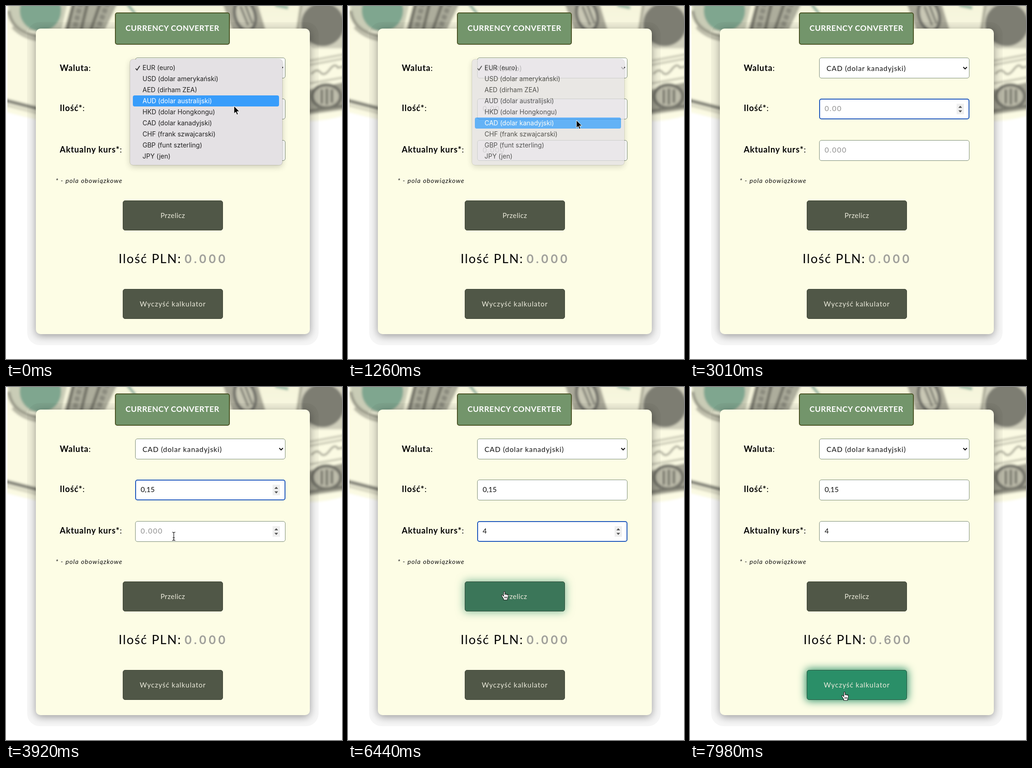
An HTML page for the animation above (8 s loop, 731 by 766 pixels).

```html
<!DOCTYPE html>
<html lang="pl">
<head>
<meta charset="utf-8">
<title>Currency converter</title>
<style>
  html, body { margin: 0; width: 100%; height: 100%; overflow: hidden; background: #fff; }
  #stage { position: relative; width: 731px; height: 766px; overflow: hidden; font: 15.5px/20px Lato, sans-serif; color: #111; }
  #stage div, #stage svg { position: absolute; box-sizing: border-box; white-space: pre; }
  .card { left: 65px; top: 49px; width: 596px; height: 663px; border-radius: 10px; background: #fdfde5;
    box-shadow: 0 4px 18px rgba(0, 0, 0, .38), 0 5px 0 19px rgba(0, 0, 0, .035); }
  .title { left: 237px; top: 14px; width: 250px; height: 70px; border: 2px solid #4b5526; border-radius: 5px;
    background: #73956b; color: #fff; font-size: 17px; font-weight: 700; line-height: 63px;
    letter-spacing: .5px; text-align: center; }
  .label { left: 117px; font-size: 18px; font-weight: 700; letter-spacing: .9px; color: #000; }
  .label span { font-weight: 400; }
  .note { left: 108px; top: 369px; font-size: 14px; font-style: italic; letter-spacing: 1.1px; }
  .field { left: 281px; width: 327px; height: 45px; border: 1px solid #7c8d75; border-radius: 5px; background: #fff; }
  .field.focus { border: 2px solid #2159bd; }
  .value { left: 293px; }
  .value.empty { color: #8f8f8f; letter-spacing: 1.8px; }
  .spin { left: 580px; width: 16px; height: 23px; background: #efefef; }
  .spin.hot { background: #d0d0d0; }
  .spin svg { left: 0; top: 0; }
  .button { left: 254px; width: 218px; height: 65px; border: 1px solid #3c4234; border-radius: 5px;
    color: #ecebdc; font-size: 15px; line-height: 62px; text-align: center; }
  .result { top: 532px; font-size: 27px; line-height: 32px; letter-spacing: 1.9px; color: #000; }
  .digits { top: 533px; font: 600 25px/32px Inter, sans-serif; letter-spacing: 4.3px; color: #a0a09b; }
  .menu { left: 270px; top: 116px; width: 331px; height: 229px; border-radius: 6px; background: #e4e1e4;
    box-shadow: 0 0 0 .5px rgba(0, 0, 0, .25), 0 4px 14px rgba(0, 0, 0, .2);
    font: 14px/24px Inter, sans-serif; color: #222; }
  .row { left: 6px; width: 318px; height: 24px; padding-left: 21px; border-radius: 4px; }
  .row.on { background: #389dfb; color: #fff; }
</style>
</head>
<body>
<div id="stage">
  <svg width="731" height="270" viewBox="0 0 731 270">
    <defs>
      <filter id="soft"><feGaussianBlur stdDeviation="2.6"/></filter>
      <linearGradient id="paper" x1="0" y1="0" x2="0" y2="1">
        <stop offset="0" stop-color="#f4f3da"/>
        <stop offset=".3" stop-color="#fbfae3"/>
        <stop offset="1" stop-color="#fbfae3"/>
      </linearGradient>
      <clipPath id="sheet"><path d="M3 0H731V270H3Z"/></clipPath>
    </defs>
    <g clip-path="url(#sheet)"><g filter="url(#soft)" fill="none">
      <path d="M-9-9H740V236Q700 250 650 250H80Q40 240-9 228Z" fill="url(#paper)"/>
      <path d="M4-9H134L120 54H30Q8 40 4-9Z" fill="#c9ccb6"/>
      <circle cx="75" cy="10" r="45" fill="#7fa68f"/>
      <path d="M6 10Q12 56 70 66" stroke="#9b9b8b" stroke-width="7"/>
      <path d="M14 46Q36 70 72 74" stroke="#b3b2a0" stroke-width="5"/>
      <path d="M-5 204L70 223" stroke="#85857a" stroke-width="8"/>
      <path d="M-5 214L70 233" stroke="#d3d2bd" stroke-width="5"/>
      <path d="M144-9L126 54H214L244-9Z" fill="#adad9c"/>
      <path d="M148-9L133 54M178-9L163 54M206-9L184 54" stroke="#737368" stroke-width="7"/>
      <path d="M163-9L148 54M222-9L198 54" stroke="#8a8a7e" stroke-width="11" stroke-dasharray="11 4"/>
      <path d="M264-4L282 18" stroke="#94b3a0" stroke-width="6"/>
      <path d="M470-9L494 56H566L546-9Z" fill="#aaa999"/>
      <ellipse cx="520" cy="20" rx="22" ry="34" transform="rotate(-16 520 20)" fill="#c9c8b5" stroke="#72726a" stroke-width="7"/>
      <path d="M510 0L527 42M520-4L536 38" stroke="#828277" stroke-width="5"/>
      <path d="M586-2L614 4" stroke="#9cbba6" stroke-width="7"/>
      <path d="M642-9L632 58L668 92H740V-9Z" fill="#cfcebb"/>
      <path d="M643-9L633 58" stroke="#a5a492" stroke-width="5"/>
      <circle cx="689" cy="40" r="47" fill="#7d7d72"/>
      <path d="M660 119L740 104M660 128L740 113M660 168L740 154" stroke="#c0bfac" stroke-width="4"/>
      <path d="M664 148Q676 134 684 144T704 138T722 134L740 130" stroke="#a3a292" stroke-width="4"/>
      <path d="M656 182L740 164V224L656 236Z" fill="#a5a494"/>
      <ellipse cx="697" cy="196" rx="31" ry="25" fill="#bdbcaa" stroke="#717167" stroke-width="7"/>
      <path d="M687 181V212M698 179V214M709 181V210" stroke="#7a7a6f" stroke-width="6"/>
      <path d="M656 228L740 216" stroke="#77776c" stroke-width="5"/>
    </g></g>
  </svg>

  <div class="card"></div>
  <div class="title">CURRENCY CONVERTER</div>
  <div class="label" style="top:124px">Waluta<span>:</span></div>
  <div class="label" style="top:211px">Ilość*<span>:</span></div>
  <div class="label" style="top:301px">Aktualny kurs*<span>:</span></div>
  <div class="note">* - pola obowiązkowe</div>

  <div class="field" id="currency" style="top:112px"></div>
  <div id="chosen" style="left:297px;top:125px;letter-spacing:.9px"></div>
  <svg style="left:592px;top:129px" width="14" height="12"><path d="M2.5 3.5L6.5 7.5L10.5 3.5" fill="none" stroke="#111" stroke-width="2"/></svg>
  <div class="field" id="amount" style="top:201px"></div>
  <div class="value" id="amountText" style="top:212px"></div>
  <div class="spin" id="amountSpin" style="top:212px"></div>
  <div class="field" id="rate" style="top:291px"></div>
  <div class="value" id="rateText" style="top:302px"></div>
  <div class="spin" id="rateSpin" style="top:302px"></div>

  <div class="button" id="convert" style="top:422px;letter-spacing:.45px">Przelicz</div>
  <div class="result" id="result">Ilość PLN:</div>
  <div class="digits" id="digits"></div>
  <div class="button" id="clear" style="top:614px;letter-spacing:.95px">Wyczyść kalkulator</div>

  <div class="menu" id="menu">
    <svg style="left:10px;top:12px" width="14" height="14"><path d="M2 7.5L5 11L11 2" fill="none" stroke="#222" stroke-width="1.7"/></svg>
  </div>

  <svg id="pointer" width="24" height="28" style="left:0;top:0;overflow:visible">
    <path id="arrow" d="M0 0V16.5L3.8 13L6.3 19L9 17.9L6.5 12H11.8Z" fill="#000" stroke="#fff" stroke-width="1"/>
    <g id="beam" fill="none" stroke-linecap="round">
      <path d="M-3-9Q0-9 0-7V7Q0 9-3 9M3-9Q0-9 0-7M0 7Q0 9 3 9M-2 3H2" stroke="#fff" stroke-width="2.6"/>
      <path d="M-3-9Q0-9 0-7V7Q0 9-3 9M3-9Q0-9 0-7M0 7Q0 9 3 9M-2 3H2" stroke="#111" stroke-width="1.2"/>
    </g>
    <g id="hand" transform="translate(-6.6 0)" stroke="#111" stroke-width="1.1" stroke-linejoin="round">
      <path d="M5.3 11L3 8.6C1.6 7.6 0 8.8 1 10.5L5 16.5V19H13.5V16.5C14.8 14.5 15.2 13 15.2 8.5C15.2 7 13 7 13 8.2C13 6.3 10.5 6.2 10.5 7.6C10.3 5.8 8 5.8 8 7.2V2C8 .3 5.3 .3 5.3 2Z" fill="#fff"/>
      <path d="M7.5 12V15.5M9.7 12V15.5M11.9 12V15.5" fill="none"/>
    </g>
  </svg>
</div>

<script>
const LOOP = 8000, STEP = 70;
const $ = id => document.getElementById(id);
const clamp = v => Math.min(1, Math.max(0, v));
const ramp = (t, from, to) => clamp((t - from) / (to - from));
const smooth = p => p * p * (3 - 2 * p);
const during = (t, from, to) => t >= from && t < to;

const currencies = ['EUR (euro)', 'USD (dolar amerykański)', 'AED (dirham ZEA)', 'AUD (dolar australijski)',
  'HKD (dolar Hongkongu)', 'CAD (dolar kanadyjski)', 'CHF (frank szwajcarski)', 'GBP (funt szterling)', 'JPY (jen)'];
const rows = currencies.map((name, i) => {
  const row = document.createElement('div');
  row.className = 'row';
  row.style.top = 6 + i * 24 + 'px';
  row.textContent = name;
  $('menu').prepend(row);
  return row;
});

for (const id of ['amountSpin', 'rateSpin'])
  $(id).innerHTML = '<svg width="16" height="23"><path d="M4 9L8 4.5L12 9ZM4 14.5L8 19L12 14.5Z" fill="#505050"/></svg>';

// time, x, y, shape shown from that time on
const track = [
  [0, 496, 217, 'arrow'], [420, 497, 252, 'arrow'], [630, 497, 248, 'arrow'], [1750, 497, 248, 'arrow'],
  [2310, 594, 216, 'arrow'], [2590, 594, 221, 'arrow'], [2660, 572, 222, 'beam'], [2800, 540, 222, 'beam'],
  [3010, 540, 222, ''], [3430, 540, 222, 'beam'], [3570, 480, 250, 'arrow'], [3710, 410, 294, 'beam'],
  [3920, 365, 324, 'beam'], [4200, 368, 311, 'beam'], [4550, 368, 311, ''], [6090, 368, 318, 'beam'],
  [6160, 366, 338, 'arrow'], [6300, 352, 425, 'hand'], [6580, 328, 461, 'hand'], [7210, 328, 461, 'hand'],
  [7420, 318, 505, 'hand'], [7490, 319, 530, 'arrow'], [7700, 328, 618, 'hand'], [7980, 336, 661, 'hand'], [LOOP, 336, 661, 'hand']
];

function pointerAt(t) {
  const i = track.findLastIndex(k => k[0] <= t);
  const [t0, x0, y0, shape] = track[i], [t1, x1, y1] = track[Math.min(i + 1, track.length - 1)];
  const p = ramp(t, t0, t1);
  return { x: x0 + (x1 - x0) * p, y: y0 + (y1 - y0) * p, shape };
}

const mix = (a, b, p) => `rgb(${a.map((v, i) => Math.round(v + (b[i] - v) * p))})`;
function paintButton(id, p) {
  const s = $(id).style;
  s.background = mix([80, 87, 71], [42, 143, 104], p);
  s.borderColor = mix([60, 66, 52], [38, 84, 62], p);
  s.boxShadow = `0 0 18px 2px rgba(42,143,104,${p})`;
}

function typed(id, text, hint) {
  $(id).textContent = text || hint;
  $(id).classList.toggle('empty', !text);
}

function render(t) {
  const { x, y, shape } = pointerAt(t);
  $('pointer').style.transform = `translate(${x}px,${y}px)`;
  for (const id of ['arrow', 'beam', 'hand']) $(id).style.display = id === shape ? '' : 'none';

  $('menu').style.opacity = 1 - ramp(t, 1200, 1470);
  const hot = during(t, 980, 1050) ? -1 : t < 1470 ? Math.floor((y - 122) / 24) : 5;
  rows.forEach((row, i) => row.classList.toggle('on', i === hot));

  $('chosen').textContent = currencies[t < 1330 ? 0 : 5];
  $('currency').classList.toggle('focus', during(t, 1330, 2940));
  $('amount').classList.toggle('focus', during(t, 2940, 4270));
  $('rate').classList.toggle('focus', during(t, 4270, 6790));
  $('amountSpin').hidden = !during(t, 2240, 4270);
  $('amountSpin').classList.toggle('hot', t < 2660);
  $('rateSpin').hidden = !during(t, 3710, 6790);

  typed('amountText', '0,15'.slice(0, clamp((t - 3010) / 280) * 4 + .01), '0.00');
  typed('rateText', t < 4830 ? '' : '4', '0.000');

  const done = t >= 6930;
  $('result').style.left = (done ? 247 : 245) + 'px';
  $('digits').style.left = (done ? 390 : 388) + 'px';
  $('digits').textContent = done ? '0.600' : '0.000';

  paintButton('convert', smooth(ramp(t, 6280, 6580)) * (1 - smooth(ramp(t, 7420, 7720))));
  paintButton('clear', smooth(ramp(t, 7680, 7960)));
}

const start = performance.now();
function tick() {
  const t = (performance.now() - start) % LOOP;
  render(Math.floor(t / STEP) * STEP);
  requestAnimationFrame(tick);
}
tick();
</script>
</body>
</html>
```
